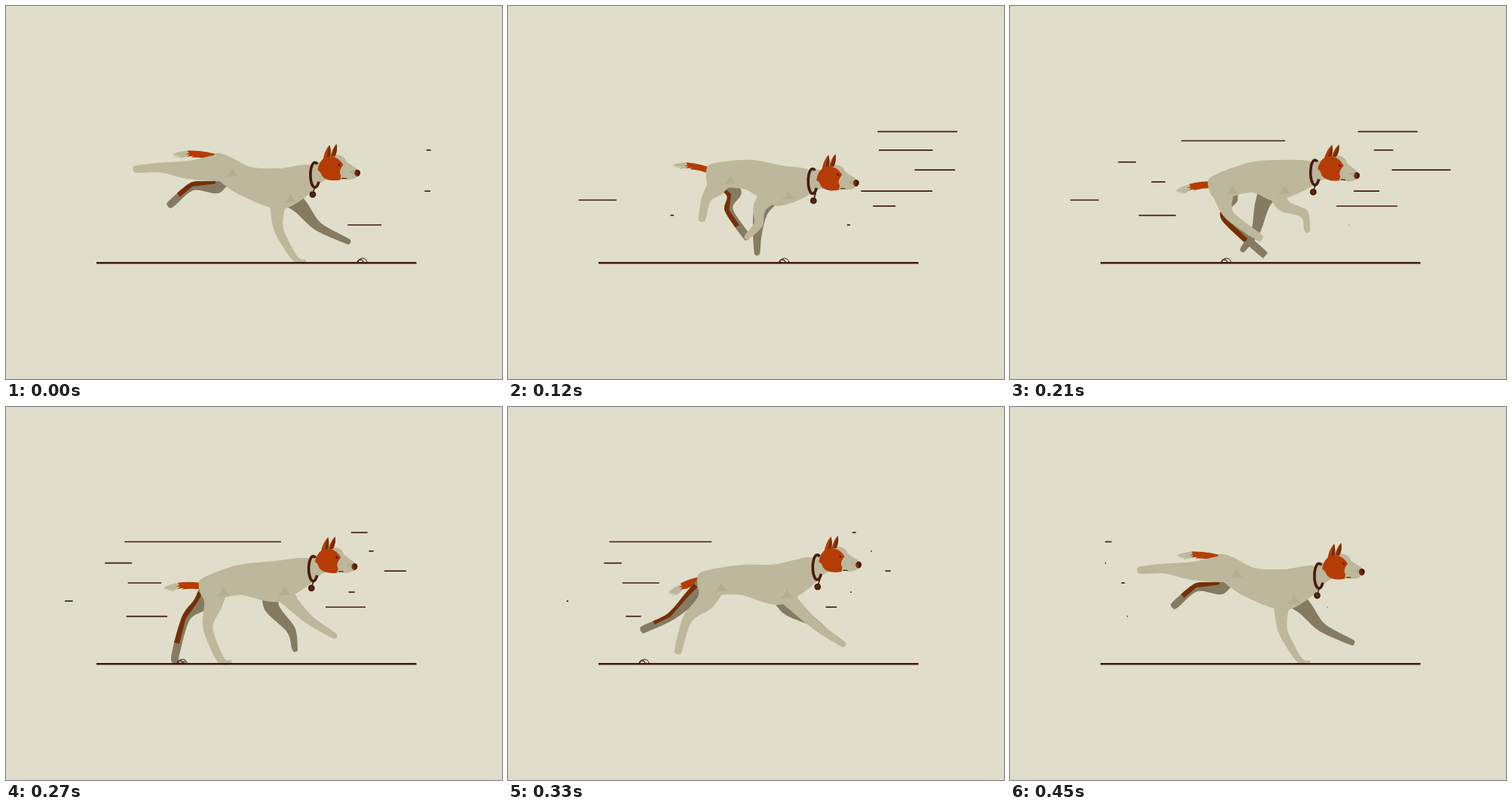
Recreate the animation shown at these times as an HTML page. Size 658 px wide and 494 px high, loop 480 ms.

```html
<!DOCTYPE html>
<html lang="en">
<head>
<meta charset="utf-8">
<title>Running dog</title>
<style>
  html, body { margin: 0; width: 100%; height: 100%; overflow: hidden; background: #e0deca; }
  svg { display: block; width: 100vw; height: 100vh; }
</style>
</head>
<body>
<svg viewBox="0 0 658 494">
  <defs>
    <clipPath id="legClip"><path id="legShape"/></clipPath>
  </defs>
  <g id="speed" fill="none" stroke="#431a10" stroke-width="1.7"></g>
  <path id="tailTip" fill="#bdb79b"/>
  <path id="tailBase" fill="#b53c04"/>
  <g fill="#857b63">
    <path id="frontFar"/>
    <path id="hindFar"/>
  </g>
  <path id="stripe" clip-path="url(#legClip)" fill="none" stroke="#762f06" stroke-width="11"/>
  <g fill="#bdb79b">
    <path id="hindNear"/>
    <path id="frontNear"/>
    <path id="torso"/>
  </g>
  <path id="shade" fill="#a8a086" opacity=".45"/>
  <path id="neck" fill="#bdb79b"/>
  <path id="collar" fill="none" stroke="#471b0e" stroke-width="3.6"/>
  <g id="tag">
    <path d="M1-4L3-10" stroke="#471b0e" stroke-width="1.6"/>
    <circle r="4.4" fill="#471b0e"/>
    <circle r="2.2" fill="#64260b"/>
  </g>
  <g id="head">
    <path fill="#bdb79b" d="M428 199C440 194 449 198 451 206L465 215Q470 220 466 226L460 229Q451 231 440 229Z"/>
    <path fill="#b53c04" d="M420 204Q422 191 429 183.5Q431 192 429 201Z"/>
    <path fill="#762f06" d="M425 201Q426 192 429 184Q431.500 193 429.500 200Z"/>
    <path fill="#b53c04" d="M430 199Q432 189 438 182.500Q440 191 436 199Z"/>
    <path fill="#762f06" d="M432 199Q434 189 438 182.500Q440 191 436 199Z"/>
    <path fill="#b53c04" d="M413 217C415 205 421 199 430 199C438 199 443 204 447 210C443 215 441 220 444 224L443 230C434 232 424 231 419 225Q417 219 413 217Z"/>
    <circle cx="441.500" cy="210" r="1.600" fill="#5a2007"/>
    <path d="M445 228.300H451" stroke="#471b0e" stroke-width="1.300"/>
    <path d="M446 229.800H450" stroke="#ece8d8"/>
    <path d="M457 219.500h1m2-1.500h1m-1 3h1" stroke="#81765e"/>
    <ellipse cx="465.700" cy="221" rx="3.900" ry="4.500" fill="#762f06"/>
    <path fill="#471b0e" d="M463 217.500Q468 216 469.600 220Q468 225 465 225.500Q468 221 463 217.500Z"/>
  </g>
  <g id="pebble" fill="none" stroke="#431a10">
    <path d="M-5.500 340A6 6 0 0 1 6.500 340"/>
    <path d="M-6.500 340A4 4 0 0 1 1.500 340" stroke-width="1.500"/>
  </g>
  <path d="M120 340.200H544.500" stroke="#3f180d" stroke-width="2.400"/>
</svg>
<script>
const STEP = 30, COUNT = 16;
const $ = id => document.getElementById(id);
const put = (id, d) => $(id).setAttribute("d", d);
const move = (id, x, y, turn = "") => $(id).setAttribute("transform", `translate(${x} ${y})${turn}`);
const lerp = (a, b, t) => a.map((v, i) => v + (b[i] - v) * t);
const shift = (p, x, y) => [p[0] + x, p[1] + y];
const wave = (s, peak, size) => size * Math.cos((s - peak) * 2 * Math.PI / COUNT);
const points = text => text.split(" ").map(p => p.split(",").map(Number));

// Joints in six key poses. Spine: rump, waist, chest. Legs: knee, ankle, paw.
const keys = {
  spine: ["288,214 318,232 365,242", "282,217 318,225 362,238", "283,230 320,222 358,238",
    "283,237 320,227 352,231", "276,238 310,229 357,231", "271,232 310,229 358,235"],
  hindNear: ["242,217 205,214 174,216", "266,234 245,240 219,261", "283,250 281,271 296,300",
    "284,256 292,278 330,306", "275,262 268,293 285,335", "262,258 238,281 226,322"],
  hindFar: ["278,239 247,239 219,262", "295,246 290,265 303,297", "305,252 296,275 329,312",
    "292,258 286,281 335,327", "257,262 238,281 224,335", "244,252 215,278 181,294"],
  frontNear: ["360,272 363,299 384,335", "331,266 326,289 306,306", "338,265 338,290 331,303",
    "362,263 390,275 394,295", "381,261 404,283 434,302", "380,262 411,291 443,313"],
  frontFar: ["391,266 414,292 452,311", "347,272 348,303 354,335", "326,266 314,297 307,315",
    "335,262 326,298 310,321", "352,264 378,295 383,319", "372,266 404,284 419,295"],
  tail: ["220,198", "214,193", "221,231", "219,246", "208,241", "212,247"]
};
const widths = {
  torso: [11, 17, 20, 27, 14],
  hindNear: [16, 12, 6.5, 5, 2.5], hindFar: [15, 10, 5.5, 5, 2.5],
  frontNear: [14, 9, 6, 4, 2], frontFar: [14, 10, 6, 4, 2]
};
// Legs change on every second step; two drawings lie midway between keys.
const drawings = [0, 1, 1.5, 2, 3, 4, 5, 5.5];

function pose(name, p) {
  const rows = keys[name], i = Math.floor(p);
  const a = points(rows[i]), b = points(rows[(i + 1) % rows.length]);
  return a.map((q, j) => lerp(q, b[j], p - i));
}

function towards(a, b, length) {
  const dx = b[0] - a[0], dy = b[1] - a[1], s = length / Math.hypot(dx, dy);
  return [dx * s, dy * s];
}

// One side of a chain of joints; the other side has negative widths.
function edge(chain, w, side) {
  return chain.map((p, i) => {
    const a = chain[Math.max(i - 1, 0)], b = chain[Math.min(i + 1, chain.length - 1)];
    const [dx, dy] = towards(a, b, w[i] * side);
    return shift(p, -dy, dx);
  });
}

// Closed Catmull-Rom curve.
function smooth(pts) {
  const at = i => pts[(i + pts.length) % pts.length];
  return pts.reduce((d, b, i) => {
    const [a, c, e] = [at(i - 1), at(i + 1), at(i + 2)];
    const c1 = b.map((v, j) => v + (c[j] - a[j]) / 7);
    const c2 = c.map((v, j) => v - (e[j] - b[j]) / 7);
    return d + `C${c1} ${c2} ${c}`;
  }, "M" + at(0)) + "Z";
}

const ribbon = (chain, w) => smooth([...edge(chain, w, 1), ...edge(chain, w, -1).reverse()]);

// A paw on the ground gets a flat toe, a lifted one goes on straight.
function leg(name, root, p) {
  const chain = [root, ...pose(name, p)], paw = chain[3];
  const toe = paw[1] > 333 ? [paw[0] + 13, 338] : shift(paw, ...towards(chain[2], paw, 5));
  chain.push(toe);
  const shape = ribbon(chain, widths[name]);
  put(name, shape);
  return { chain, shape };
}

function drawBody(p, collar) {
  const [rump, waist, chest] = pose("spine", p);
  const rear = shift(rump, ...towards(waist, rump, 18));
  put("torso", ribbon([rear, rump, waist, chest, collar], widths.torso));
  leg("hindNear", rump, p);
  leg("frontNear", chest, p);
  leg("frontFar", chest, p);

  const { chain, shape } = leg("hindFar", rump, p);
  const back = edge(chain, widths.hindFar, 1);
  put("legShape", shape);
  put("stripe", "M" + [lerp(back[0], back[1], .6), back[1], back[2], lerp(back[2], back[3], .6)].join("L"));

  const fold = ([x, y]) => `M${x - 9} ${y + 5}Q${x - 2} ${y} ${x} ${y - 8}Q${x + 3} ${y} ${x + 9} ${y + 3}Z`;
  put("shade", fold(shift(rump, 12, 8)) + fold(shift(chest, 12, 14)));
  drawTail(shift(rear, 5, -5), pose("tail", p)[0]);
}

function drawTail(root, tip) {
  const [bx, by] = root, [tx, ty] = tip;
  const [mx, my] = shift(lerp(root, tip, .66), 0, -3);
  const [cx, cy] = shift(lerp(root, [mx, my], .5), 0, -3);
  put("tailBase", `M${bx} ${by - 4}Q${cx} ${cy - 4} ${mx + 1} ${my - 4}l2 3l-4 2l5 0l-3 3l8-1l-3 2`
    + `Q${cx + 3} ${cy + 5} ${bx} ${by + 5}Z`);
  put("tailTip", `M${mx + 6} ${my - 4}Q${(mx + tx) / 2} ${(my + ty) / 2 - 5} ${tx} ${ty - 1}`
    + `l5 0l-4 2l8-1l-4 3l7-2l-2 3L${mx + 5} ${my + 3}Z`);
}

function drawHead(s, [cx, cy]) {
  const dx = -1.7 - wave(s, 6, 3);
  const dy = -.6 + wave(s, 3.3, 12) - wave(2 * s, 1.6, 3.1);
  const nod = 6 * Math.exp(-((s - 7.4) ** 2) / 3);
  move("head", dx, dy, ` rotate(${nod} 432 212)`);
  move("tag", cx - wave(2 * s, 0, 2), cy + 26);
  put("neck", `M${cx - 3} ${cy - 13}L${cx + 2} ${cy - 16}L${424 + dx} ${205 + dy}L${428 + dx} ${229 + dy}`
    + `Q${cx + 10} ${cy + 8} ${cx + 4} ${cy + 14}L${cx - 2} ${cy + 14}Z`);
  put("collar", `M${cx + 4} ${cy - 14}A6 16.5 0 1 0 ${cx + 6} ${cy + 9}`);
}

// Speed lines: y, right end, left end, first step
const streaks = [
  [166.3, 596, 456.3, 0], [178.5, 365, 125.5, 4], [190.8, 563.5, 481, -1],
  [206.7, 167, 125.8, 4], [217.2, 593, 500, 1], [233, 206, 147.5, 5],
  [245.2, 563, 453.8, -1], [257, 144, 77.5, 0], [265, 514, 420.5, 2],
  [277.3, 220, 155, 3], [290, 503, 449.5, -6]
];
const lines = streaks.map(() =>
  $("speed").appendChild(document.createElementNS("http://www.w3.org/2000/svg", "path")));
const remain = k => 1 - (1 - Math.exp(-.65 * Math.max(k, 0))) ** 3.6;

function drawStreaks(s) {
  streaks.forEach(([y, right, left, start], i) => {
    const k = s - start, span = right - left;
    const a = left + span * remain(k);
    const b = left + span * remain(1.17 * (k - 5.05));
    lines[i].setAttribute("d", b - a > .4 ? `M${a} ${y}H${b}` : "");
  });
}

function draw(ms) {
  const s = Math.floor(ms / STEP) % COUNT;
  const drawing = Math.floor((s + 1) / 2) % drawings.length, held = drawing * 2;
  const collar = [406.3 - wave(held, 5.8, 4), 222 + wave(held, 3.6, 10)];
  drawBody(drawings[drawing], collar);
  drawHead(s, collar);
  drawStreaks(s);
  const x = 472.5 - s * 26.55;
  move("pebble", x, 0);
  $("pebble").style.display = x > 122 ? "" : "none";
}

const began = performance.now();
function tick() {
  draw(performance.now() - began);
  requestAnimationFrame(tick);
}
tick();
</script>
</body>
</html>
```
